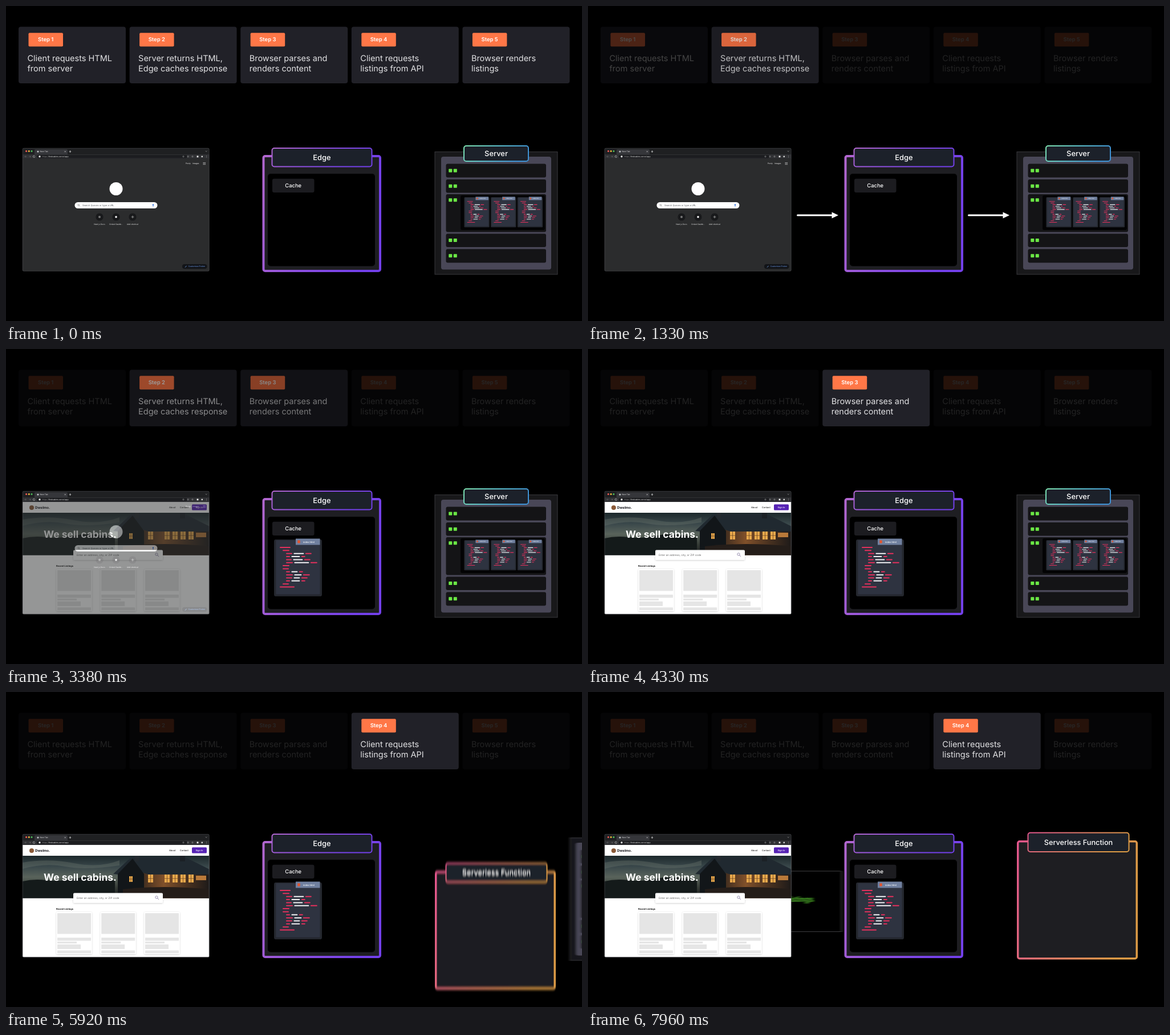
An HTML page that plays this animation: 1010 by 554 pixels, repeating every 8 s.

```html
<!DOCTYPE html>
<html lang="en">
<head>
<meta charset="utf-8">
<title>Edge caching steps</title>
<style>
  html, body { margin: 0; width: 100%; height: 100%; overflow: hidden; background: #000; }
  svg { display: block; width: 100%; height: 100%; }
  text { font-family: Inter, Roboto, sans-serif; text-rendering: geometricPrecision; white-space: pre; }
</style>
</head>
<body>
<svg id="stage" viewBox="0 0 1010 554"></svg>
<script>
const LOOP = 8000;
const DIM = 0.15;

// Markup helpers
const rect = (x, y, w, h, fill, r = 0, extra = '') =>
  `<rect x="${x}" y="${y}" width="${w}" height="${h}" rx="${r}" fill="${fill}" ${extra}/>`;
const circle = (x, y, r, fill, extra = '') =>
  `<circle cx="${x}" cy="${y}" r="${r}" fill="${fill}" ${extra}/>`;
const path = (d, fill, extra = '') => `<path d="${d}" fill="${fill}" ${extra}/>`;
const line = (d, color, width) =>
  path(d, 'none', `stroke="${color}" stroke-width="${width}" stroke-linecap="round"`);
const text = (x, y, size, str, fill = '#fff', weight = 400, anchor = 'start') =>
  `<text x="${x}" y="${y}" font-size="${size}" fill="${fill}" font-weight="${weight}" text-anchor="${anchor}">${str}</text>`;
const group = (id, body, extra = '') => `<g id="${id}" ${extra}>${body}</g>`;
const gradient = (id, stops, dir = 'x2="1" y2="0.25"') =>
  `<linearGradient id="${id}" ${dir}>` +
  stops.map((c, i) => `<stop offset="${i / (stops.length - 1)}" stop-color="${c}"/>`).join('') +
  '</linearGradient>';
const blurFilter = id =>
  `<filter id="${id}-blur" filterUnits="userSpaceOnUse" x="-100" y="-100" width="1500" height="1000"><feGaussianBlur stdDeviation="0"/></filter>`;

const MOVERS = ['fileIn', 'fileOut', 'server', 'func', 'request'];

const defs = '<defs>' +
  gradient('edgeInk', ['#b267cf', '#8d4fdf', '#7340ea']) +
  gradient('serverInk', ['#7fe3b0', '#5cc0cc', '#3f93d6']) +
  gradient('funcInk', ['#e4568d', '#dd7a68', '#dd9b45']) +
  gradient('sky', ['#1c282b', '#39474a', '#59635b', '#343a35', '#16191a'], 'x2="0" y2="1"') +
  gradient('wall', ['#1b1c1f', '#3a2a1e', '#80502a', '#4a3220', '#1d1a19'], 'x2="1" y2="0"') +
  MOVERS.map(blurFilter).join('') +
  '<filter id="shadow" x="-20%" y="-20%" width="140%" height="150%"><feDropShadow dx="0" dy="0.8" stdDeviation="1.6" flood-opacity="0.2"/></filter>' +
  '<clipPath id="window"><rect x="29" y="250" width="327.5" height="216.5" rx="2"/></clipPath>' +
  '<clipPath id="hero"><rect x="29" y="288" width="327.5" height="74.5"/></clipPath></defs>';

// Step cards
const STEPS = [
  ['Client requests HTML', 'from server'],
  ['Server returns HTML,', 'Edge caches response'],
  ['Browser parses and', 'renders content'],
  ['Client requests', 'listings from API'],
  ['Browser renders', 'listings'],
];
const stepCard = (lines, i) => {
  const x = 22 + i * 194.6;
  return group('step' + i,
    rect(x, 36.5, 188, 99.5, '#212128', 4) +
    rect(x + 17.5, 47.3, 60.5, 24, '#ff7747', 2) +
    text(x + 47.7, 62.4, 9.5, 'Step ' + (i + 1), '#fff', 600, 'middle') +
    lines.map((s, n) => text(x + 15.5, 96.8 + n * 17.7, 14.5, s, '#e2e2e4')).join(''));
};

// HTML file, drawn from its own top-left corner: indent, then red, white, red run lengths
const CODE = [
  [10, 19], [15, 12], [21, 11, 18, 11], [21, 7, 15, 7], [21, 10, 17, 11], [21, 12, 26, 12],
  [15, 12], [15, 11], [21, 7, 11, 7], [21, 12, 13, 12], [21, 11, 11, 11], [21, 7, 15, 7],
  [15, 11], [10, 26],
];
const codeRow = ([x, ...runs], row) => runs.map((w, i) => {
  const bar = rect(x, 14.5 + row * 5.35, w, 2, i === 1 ? '#f1f1f4' : '#e5305c', 1);
  x += w + 2.4;
  return bar;
}).join('');
const file =
  rect(0, 1.5, 84, 100, '#24272e', 3) + rect(3.5, 3, 77, 95, '#2e3340') +
  rect(38, 0, 42.5, 11, '#70809f') + rect(41.3, 3, 4.4, 5, '#e4552f') +
  text(51, 7.2, 4, 'index.html', '#fff', 500) + CODE.map(codeRow).join('');

// Browser
const toolbar =
  rect(29, 250, 327.5, 19, '#1f2022') + path('M50 261v-7q0-2 2-2h54q2 0 2 2v7z', '#35363a') +
  ['#f25c54', '#f4bd3d', '#4fc25a'].map((c, i) => circle(35.6 + i * 4.7, 255.2, 1.5, c)).join('') +
  circle(56, 256, 1.6, '#c4c6ca') + text(59.5, 257.3, 3.4, 'New Tab', '#e4e4e6') +
  line('M102.7 255l2 2m0-2l-2 2', '#ddd', 0.5) + line('M111 256h3m-1.5-1.5v3', '#fff', 0.6) +
  line('M350 255l1.2 1.2 1.2-1.2', '#ccc', 0.5) +
  rect(29, 261, 327.5, 7.5, '#303134') + rect(54, 262, 264, 5.5, '#1c1d20', 2.7) +
  line('M36 264.8h-3m1.2-1.2l-1.2 1.2 1.2 1.2', '#777', 0.5) +
  line('M40.5 264.8h3m-1.2-1.2l1.2 1.2-1.2 1.2', '#777', 0.5) +
  line('M50.3 263.6a1.7 1.7 0 1 0 .4 1.5', '#ddd', 0.6) +
  circle(59, 264.8, 1.7, '#ddd') +
  text(63.5, 266, 3.4, '<tspan fill="#999">https://</tspan>findcabins.vercel.app', '#f0f0f0') +
  [311, 319, 327].map(x => circle(x, 264.7, 1.1, 'none', 'stroke="#bbb" stroke-width=".5"')).join('') +
  rect(334.6, 263.4, 2.8, 2.8, '#eee') + circle(343.8, 264.8, 1.4, '#ddd') +
  [263.4, 264.8, 266.2].map(y => circle(351.5, y, 0.4, '#ddd')).join('');

const shortcut = (x, label, icon) =>
  circle(x, 371, 6.6, '#18191b') + icon + text(x, 384.7, 3.3, label, '#eee', 400, 'middle');

const newTab =
  rect(29, 268.5, 327.5, 198, '#2b2c2d') + rect(29, 268.5, 327.5, 0.5, '#55565a') +
  text(315, 278.3, 3.3, 'Posty', '#fff') + text(327.3, 278.3, 3.3, 'Images', '#fff') +
  [0, 1, 2].map(r => [0, 1, 2].map(c => rect(345.6 + c * 1.6, 275 + r * 1.6, 1, 1, '#ccc')).join('')).join('') +
  circle(193, 321.5, 11.5, '#fff') +
  rect(120.5, 345, 145, 11, '#fff', 5.5) +
  circle(127.2, 350, 1.4, 'none', 'stroke="#666" stroke-width=".5"') + line('M128.2 351l1.2 1.2', '#666', 0.5) +
  text(134, 352, 4, 'Search Quovex or type a URL', '#55585d') +
  rect(257, 348, 1.9, 3.6, '#3f7be0', 0.9) + line('M258 352v1.3', '#3f7be0', 0.6) +
  shortcut(164, 'Next.js Docs', circle(164, 371, 2, '#777')) +
  shortcut(193, 'Ordvel Dashb...', circle(193, 371, 1.8, '#fff')) +
  shortcut(222, 'Add shortcut', line('M220 371h4m-2-2v4', '#ddd', 0.6)) +
  rect(309, 454, 43.5, 8.3, '#121418', 4.1) + line('M314.3 459.4l2-2.2', '#7cabf5', 0.8) +
  text(319.5, 459.4, 3.6, 'Customize Frolen', '#6d9df0');

const windowPane = (x, y, w, h) =>
  rect(x, y, w, h, '#e9a94c') + rect(x + w / 2 - 0.3, y, 0.6, h, '#4a2b18') + rect(x, y + h / 2 - 0.3, w, 0.6, '#4a2b18');
const hero = `<g clip-path="url(#hero)">` +
  rect(29, 288, 327.5, 75, 'url(#sky)') +
  path('M29 300q45-8 90 1t80-5v9q-60 9-95 2t-75 4z', '#66716a', 'opacity=".4"') +
  path('M29 333q20-5 42-2t50-3 70 4v31H29z', '#141a1a') +
  path('M198 318h159v45H196z', 'url(#wall)') +
  path('M188 320l32-30h93l44 22v9H250l-28-9-24 9z', '#202930') +
  path('M222 293l-26 27v42h46v-42z', '#121619') +
  rect(226, 286, 7, 12, '#242a2f') + rect(305, 288, 9, 10, '#1b2126') +
  windowPane(216, 324, 6, 10) + [249, 278, 292, 306, 320].map(x => windowPane(x, 321, 9, 14)).join('') +
  rect(333, 323, 18, 8, '#b97a3a') + path('M205 347q70-8 152 0v16H205z', '#241d19') + '</g>';

const listing = x =>
  rect(x, 387, 62, 74, '#fff', 1.5, 'filter="url(#shadow)"') +
  [[389, 36.5, 59], [432, 5.5, 59], [439, 3.2, 34], [444, 8, 41], [454.5, 5, 59]]
    .map(([y, h, w]) => rect(x + 1.5, y, w, h, '#e5e5e5', 0.5)).join('');

const page =
  rect(29, 269, 327.5, 197.5, '#fff') +
  circle(45, 279, 4, '#8a5a38') + text(51, 281.2, 6.1, 'Dwelmo.', '#17171c', 700) +
  text(286, 280, 4, 'About', '#222', 500) + text(304.8, 280, 4, 'Contact', '#222', 500) +
  rect(326, 273.2, 26, 10.3, '#5623b4', 1.5) + text(339, 280, 4, 'Sign In', '#fff', 500, 'middle') +
  hero + text(66, 332, 17.4, 'We sell cabins.', '#fff', 700) +
  rect(118, 353.5, 157, 17.5, '#fff', 2, 'filter="url(#shadow)"') +
  text(124, 363.6, 4.6, 'Enter an address, city, or ZIP code', '#666') +
  circle(264, 361, 2.2, 'none', 'stroke="#5a4a80" stroke-width=".6"') + line('M265.7 362.8l2 2', '#5a4a80', 0.7) +
  text(88, 383, 4, 'Recent Listings', '#111', 700) + [88.5, 165.7, 242.5].map(listing).join('');

// Boxes on the right
const titleBox = (x, y, w, h, ink, label, size) =>
  rect(x + 1, y + 1, w - 2, h - 2, '#1c212a', 4, `stroke="url(#${ink})" stroke-width="2"`) +
  text(x + w / 2, y + h / 2 + 4.7, size, label, '#fff', 500, 'middle');
const frame = (x, y, w, h, ink, stroke) =>
  rect(x + stroke / 2, y + stroke / 2, w - stroke, h - stroke, '#1e1e22', 3, `stroke="url(#${ink})" stroke-width="${stroke}"`);

const edge =
  frame(449.5, 262, 208.5, 206, 'edgeInk', 4) + rect(459, 295, 188, 162.5, '#000', 5) +
  titleBox(465.5, 249, 177, 34.5, 'edgeInk', 'Edge', 12.9) +
  rect(467, 303.8, 73.5, 24.2, '#1c1c20', 3) + text(503.7, 319, 9.4, 'Cache', '#fff', 500, 'middle');

const RACKS = [[277.5, 24, 289.5], [305, 23.5, 316.7], [331, 66.5, 341.2], [400.5, 23.5, 412], [427.5, 24, 439.3]];
const server =
  rect(752, 256.5, 215, 215.5, '#18181a', 0, 'stroke="#39393d" stroke-width="1"') +
  rect(763, 265, 193, 198.5, '#494757', 4) +
  RACKS.map(([y, h, led]) => rect(771.5, y, 175.5, h, '#141416', 3) +
    [776.3, 784.8].map(x => rect(x, led - 3, 6, 6, '#6be845', 0.8)).join('')).join('') +
  rect(797, 333, 148, 61, '#030304', 3) +
  [803.3, 850, 896.7].map(x => `<g transform="translate(${x} 335.5) scale(.53)">${file}</g>`).join('') +
  titleBox(802, 245, 115, 29, 'serverInk', 'Server', 12.9);

const func =
  frame(752, 261, 212, 209.5, 'funcInk', 3.5) +
  titleBox(770.5, 246.5, 179, 35.5, 'funcInk', 'Serverless Function', 12.7);

const request =
  rect(0, 0, 175, 106.5, '#050506', 2, 'stroke="#3c3d40" stroke-width="1.2"') +
  text(22, 54, 13, 'GET /api/listings', '#4fae2c', 500);

const arrow = id => group(id, line('M0 0', '#fff', 3) + path('M0-5.5L11.5 0 0 5.5z', '#fff'));

const stage = document.getElementById('stage');
stage.innerHTML = defs + rect(0, 0, 1010, 554, '#000') + STEPS.map(stepCard).join('') +
  group('edge', edge) + group('cached', file, 'transform="translate(470 333.5)"') +
  group('server', server) + group('func', func) +
  arrow('arrow0') + arrow('arrow1') +
  group('fileIn', file) + group('fileOut', file) + group('request', request) +
  `<g clip-path="url(#window)">${newTab}${group('page', page)}${toolbar}</g>` +
  rect(29.2, 250.2, 327, 216, 'none', 2, 'stroke="#55565a" stroke-width=".5"');

// Motion
const $ = id => document.getElementById(id);
const ramp = (t, a, b) => Math.min(1, Math.max(0, (t - a) / (b - a)));
const ease = p => p < 0.5 ? 4 * p ** 3 : 1 - 4 * (1 - p) ** 3;
const glide = (t, a, b, from, to) => from + (to - from) * ease(ramp(t, a, b));
const setOpacity = (id, v) => $(id).setAttribute('opacity', v.toFixed(3));

// Places a part at pos(t) = [x, y, scale] and smears it along its speed
function move(id, t, pos, shown = true) {
  const el = $(id);
  el.setAttribute('display', shown ? 'inline' : 'none');
  if (!shown) return;
  const [x, y, scale = 1] = pos(t), [px, py] = pos(t - 5), [nx, ny] = pos(t + 5);
  const bx = Math.abs(nx - px) * 0.25 / scale, by = Math.abs(ny - py) * 0.25 / scale;
  el.setAttribute('transform', `translate(${x} ${y}) scale(${scale})`);
  if (bx + by > 0.1) {
    $(id + '-blur').firstChild.setAttribute('stdDeviation', `${bx} ${by}`);
    el.setAttribute('filter', `url(#${id}-blur)`);
  } else el.removeAttribute('filter');
}

function drawArrow(id, start, p, opacity) {
  const tip = start + 73 * p, head = Math.max(start, tip - 11.5);
  const [shaft, point] = $(id).children;
  shaft.setAttribute('d', `M${start + 1.5} 368H${Math.max(start + 1.5, head)}`);
  point.setAttribute('transform', `translate(${head} 368)`);
  setOpacity(id, p > 0 ? opacity : 0);
}

const SWITCHES = [[1000, 1400], [3200, 3600], [5100, 5500]];
function stepLight(i, t) {
  const rise = i === 0 ? 1 : SWITCHES[i - 1] ? ramp(t, ...SWITCHES[i - 1]) : 0;
  const fall = SWITCHES[i] ? ramp(t, ...SWITCHES[i]) : 0;
  const intro = i === 0 ? 0 : 1 - ramp(t, 40, 440);
  return DIM + (1 - DIM) * Math.max(intro, rise - fall);
}

function render(t) {
  STEPS.forEach((_, i) => setOpacity('step' + i, stepLight(i, t)));

  const arrowLight = 1 - ramp(t, 1400, 1620);
  drawArrow('arrow0', 366, ease(ramp(t, 400, 750)), arrowLight);
  drawArrow('arrow1', 666, ease(ramp(t, 750, 1100)), arrowLight);

  move('fileIn', t, s => [glide(s, 1600, 2150, 850, 470), glide(s, 1600, 2150, 335.5, 333.5), glide(s, 1600, 2150, 0.53, 1)],
    t > 1600 && t < 2150);
  $('cached').setAttribute('display', t >= 2150 ? 'inline' : 'none');
  move('fileOut', t, s => [glide(s, 2295, 2795, 470, 240), 333.5], t > 2295 && t < 2795);
  setOpacity('page', ramp(t, 3180, 3580));

  move('server', t, s => [glide(s, 5600, 6100, 0, 290), 0], t < 6100);
  move('func', t, s => [0, glide(s, 5600, 6100, 290, 0)], t > 5600);
  move('request', t, s => [glide(s, 7707, 8407, 175, 675), 315], t > 7707);
}

const origin = performance.now();
function tick() {
  render((performance.now() - origin) % LOOP);
  requestAnimationFrame(tick);
}
tick();
</script>
</body>
</html>
```
